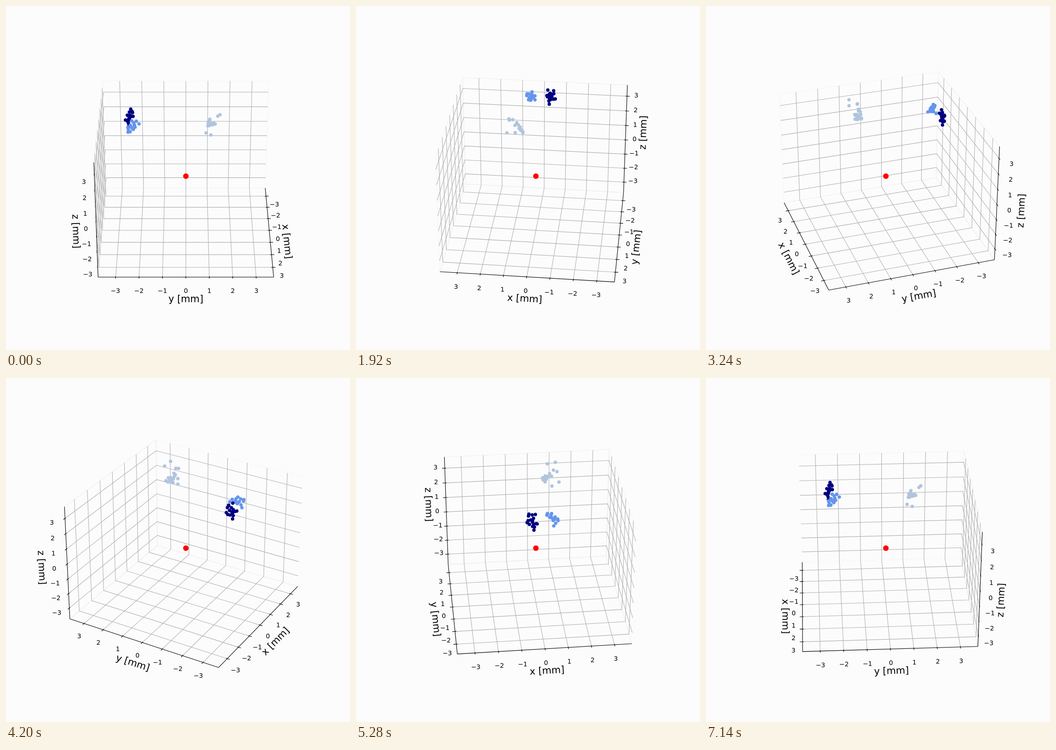
An HTML page with a canvas that plays this animation: 748 px wide and 748 px high, repeating every 7200 ms.

```html
<!DOCTYPE html>
<html>
<head>
<meta charset="utf-8">
<title>Rotating 3D scatter</title>
<style>
html, body { margin: 0; width: 100%; height: 100%; overflow: hidden; background: #fcfcfc; }
canvas { display: block; }
</style>
</head>
<body>
<canvas id="stage" width="748" height="748"></canvas>
<script>
const ctx = document.getElementById('stage').getContext('2d');
const LIMIT = 3.75, FRAME = 60, FRAMES = 120;
const SCALE = [0.15873, 0.15873, 0.11905]; // data unit to box unit
const TICKS = [-3, -2, -1, 0, 1, 2, 3];
const TICK_PAD = 0.4, LABEL_PAD = 0.8;

// tick: direction of the tick marks; side: coordinate taken from the near face
const AXES = [
  { name: 'x', tick: 1, side: 1, pane: 'rgba(242,242,242,.5)' },
  { name: 'y', tick: 0, side: 0, pane: 'rgba(230,230,230,.5)' },
  { name: 'z', tick: 0, side: 0, pane: 'rgba(236,236,236,.5)' }
];

// Points as x, y, z in thousandths of a box unit
const CLOUDS = [
  { color: '#b0c4de', r: 3.7, xyz: [
    104,230,538, 158,214,555, 139,161,522, 126,137,411, 179,168,423, 163,153,513,
    68,199,447, 125,157,478, 112,160,496, 102,151,478, 68,182,442, 78,159,441,
    85,189,465, 95,176,467, 85,178,454, 90,152,464, 80,149,440, 90,163,453] },
  { color: '#6495ed', r: 3.7, xyz: [
    40,-319,434, 42,-337,456, 78,-393,391, 92,-378,402, 104,-393,441, 106,-390,428,
    66,-367,471, 88,-377,449, 64,-354,455, 64,-350,436, 78,-357,412, 78,-371,431,
    70,-345,425, 85,-365,425, 55,-350,434] },
  { color: '#000080', r: 3.7, xyz: [
    -54,-393,367, -35,-414,424, -44,-387,481, -86,-379,482, -63,-366,467, -88,-370,463,
    -90,-364,424, -98,-379,418, -84,-389,410, -64,-402,400, -51,-395,391, -56,-383,451,
    -64,-402,446, -63,-391,425, -74,-379,437, -40,-402,420, -56,-393,412] },
  { color: '#ff0000', r: 6, xyz: [0, 0, 0] }
];

let sin, cos;

// Box units to [x, y, nearness]; the camera is 10 away at 30 degrees elevation
function projectBox([x, y, z]) {
  const right = cos * y - sin * x, depth = cos * x + sin * y;
  const near = Math.sqrt(0.75) * depth + z / 2;
  const up = Math.sqrt(0.75) * z - depth / 2;
  const k = 3113.3 / (10 - near);
  return [391.13 + right * k, 370 - up * k, near];
}

const project = p => projectBox(p.map((v, i) => v * SCALE[i]));

const put = (p, i, v) => p.map((old, j) => j === i ? v : old);

function line(points, color, width = 1.11) {
  ctx.strokeStyle = color;
  ctx.lineWidth = width;
  ctx.beginPath();
  for (const p of points) ctx.lineTo(...project(p).slice(0, 2));
  ctx.stroke();
}

// Push a point away from the middle, except along its own axis
const outward = (p, axis, d) => p.map((v, i) => i === axis ? v : v + (v < 0 ? -d : d));

function drawPane(axis, i, far) {
  const a = i === 0 ? 1 : 0, b = i === 2 ? 1 : 2;
  const corners = [[-1, -1], [1, -1], [1, 1], [-1, 1]];
  line(corners.map(([u, v]) => put(put(far, a, u * LIMIT), b, v * LIMIT)), axis.pane, 1.39);
}

function drawGrid(i, far) {
  const a = (i + 1) % 3, b = (i + 2) % 3;
  for (const t of TICKS) {
    const meet = put(far, i, t);
    line([put(meet, a, -far[a]), meet, put(meet, b, -far[b])], '#b0b0b0');
  }
}

function drawAxis(axis, i, far) {
  const start = put(far, axis.side, -far[axis.side]);
  const end = put(start, i, -far[i]);
  line([start, end], '#000');

  const d = axis.tick, edge = start[d], out = Math.sign(edge);
  ctx.fillStyle = '#000';
  ctx.textAlign = 'center';
  ctx.font = '13.89px "DejaVu Sans", sans-serif';
  for (const t of TICKS) {
    const p = put(start, i, t);
    line([put(p, d, edge - 0.06 * out), put(p, d, edge + 0.12 * out)], '#000');
    const [x, y] = project(outward(p, i, TICK_PAD));
    ctx.fillText(String(t).replace('-', '−'), x, y + 10.6);
  }

  const [x0, y0] = project(start), [x1, y1] = project(end);
  let angle = Math.atan2(y1 - y0, x1 - x0);
  if (angle >= Math.PI / 2) angle -= Math.PI;
  if (angle < -Math.PI / 2) angle += Math.PI;
  const [x, y] = project(outward(put(start, i, 0), i, LABEL_PAD));
  ctx.save();
  ctx.translate(x, y);
  ctx.rotate(angle);
  ctx.font = '20.83px "DejaVu Sans", sans-serif';
  ctx.fillText(axis.name + ' [mm]', 0, 5.75);
  ctx.restore();
}

function drawClouds() {
  const clouds = CLOUDS.map(({ color, r, xyz }) => {
    const points = [];
    for (let i = 0; i < xyz.length; i += 3)
      points.push(projectBox(xyz.slice(i, i + 3).map(v => v / 1000)));
    return { color, r, points, near: Math.max(...points.map(p => p[2])) };
  });
  clouds.sort((a, b) => a.near - b.near);
  for (const { color, r, points } of clouds) {
    ctx.fillStyle = color;
    for (const [x, y] of points) {
      ctx.beginPath();
      ctx.arc(x, y, r, 0, 2 * Math.PI);
      ctx.fill();
    }
  }
}

function draw(step) {
  const azimuth = step * 2 * Math.PI / FRAMES;
  sin = Math.sin(azimuth);
  cos = Math.cos(azimuth);
  const far = [cos < -1e-9 ? LIMIT : -LIMIT, sin < -1e-9 ? LIMIT : -LIMIT, -LIMIT];
  ctx.fillStyle = '#fcfcfc';
  ctx.fillRect(0, 0, 748, 748);
  AXES.forEach((axis, i) => drawPane(axis, i, far));
  AXES.forEach((axis, i) => drawGrid(i, far));
  AXES.forEach((axis, i) => drawAxis(axis, i, far));
  drawClouds();
}

const begin = performance.now();
function tick() {
  draw(Math.floor((performance.now() - begin) / FRAME) % FRAMES);
  requestAnimationFrame(tick);
}
tick();
</script>
</body>
</html>
```
